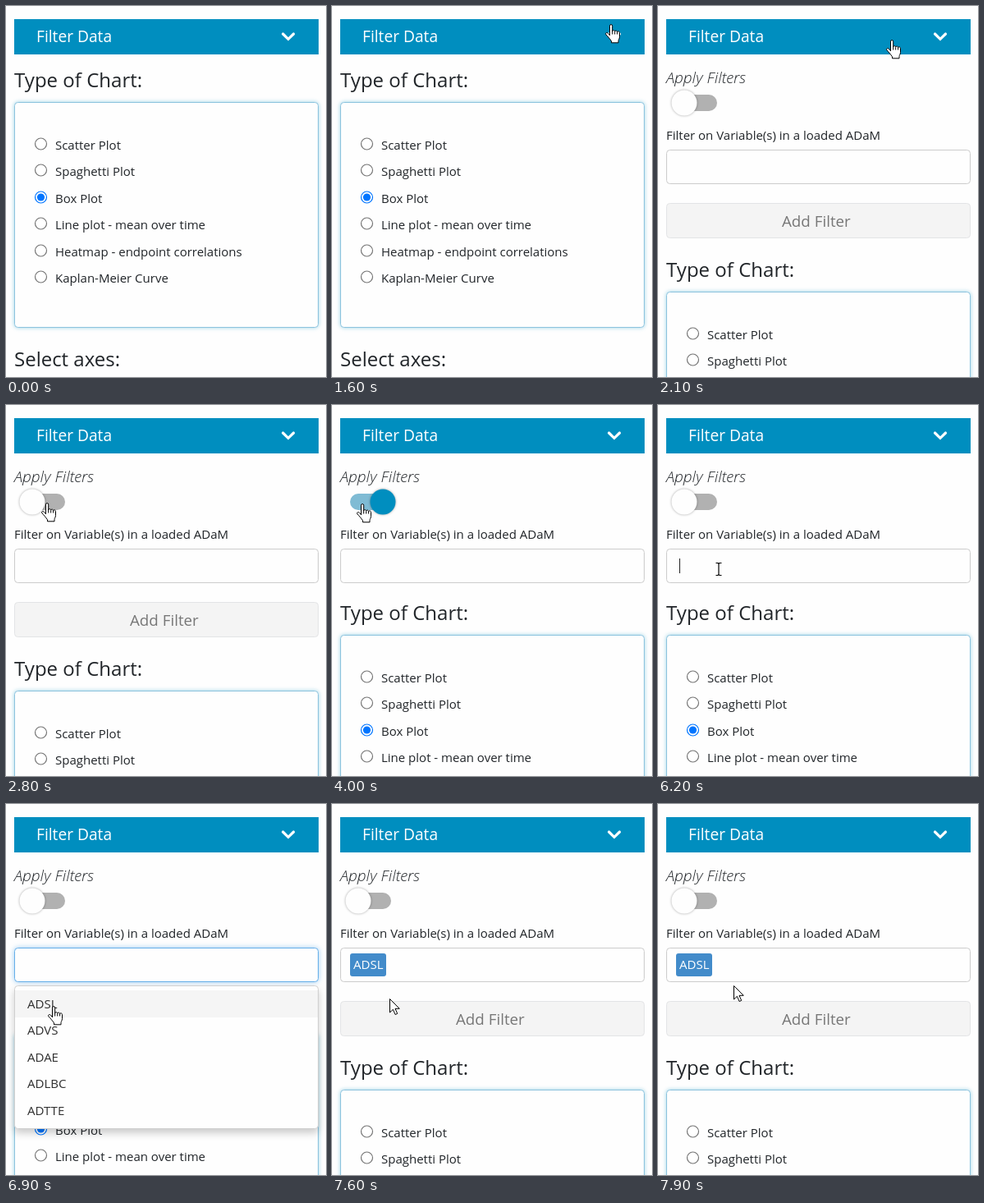
An HTML page for the animation above (8 s loop, 390 px wide and 452 px high).

```html
<!DOCTYPE html>
<html lang="en">
<head>
<meta charset="utf-8">
<title>Filter Data</title>
<style>
html, body { margin: 0; height: 100%; overflow: hidden; background: #fefefe; }
svg { display: block; width: 390px; height: 452px; font: 15px "Open Sans", sans-serif; fill: #212529; }
.big { font-size: 24px; }
.mid { font-size: 19.2px; }
.box { fill: #fefefe; stroke: #8cc3de; filter: drop-shadow(0 0 2.5px rgba(0, 142, 191, .4)); }
.field { fill: #fefefe; stroke: #ccc; }
.field.focus { stroke: #66afe9; filter: drop-shadow(0 0 3px rgba(102, 175, 233, .65)); }
.menu { fill: #fefefe; stroke: #d0d0d0; filter: drop-shadow(0 5px 5px rgba(0, 0, 0, .2)); }
.pointer { fill: #fff; stroke: #000; stroke-linejoin: round; }
</style>
</head>
<body>
<svg viewBox="0 0 390 452">
  <defs><clipPath id="clip"><rect id="window" y="59" width="390" height="0"/></clipPath></defs>

  <g id="charts">
    <text class="big" x="10" y="99">Type of Chart:</text>
    <rect class="box" x="10.5" y="117.5" width="370" height="274" rx="4"/>
    <g id="radios"></g>
    <text class="big" x="10" y="439">Select axes:</text>
    <rect class="box" x="10.5" y="457.5" width="370" height="274" rx="4"/>
  </g>

  <g clip-path="url(#clip)">
    <text class="mid" x="10" y="94" font-style="italic" font-weight="300">Apply Filters</text>
    <rect id="track" x="22" y="108" width="50" height="20" rx="10"/>
    <circle id="knob" cy="118" r="15.5" style="filter:drop-shadow(0 0 1.5px rgba(0,0,0,.35))"/>
    <text x="10" y="163">Filter on Variable(s) in a loaded ADaM</text>
    <rect id="field" class="field" x="10.5" y="175.5" width="370" height="41" rx="4"/>
    <path id="caret" d="M26.5 187v18" stroke="#222"/>
    <g id="tag">
      <rect x="22" y="182" width="44" height="28" rx="3" fill="#428bca"/>
      <text x="26" y="201" fill="#fff">ADSL</text>
    </g>
    <g id="add">
      <rect x="10.5" y="240.5" width="370" height="42" rx="4" fill="#f4f4f4" stroke="#e3e4e6"/>
      <text x="151" y="269" font-size="18.75" fill="#777">Add Filter</text>
    </g>
  </g>

  <g id="menu">
    <rect class="menu" x="10.5" y="221.5" width="370" height="174" rx="4"/>
    <rect x="11" y="227" width="369" height="33" fill="#f5f5f5"/>
  </g>

  <rect x="10" y="16" width="371" height="43" fill="#008ebf"/>
  <text class="mid" x="37" y="44" fill="#fff">Filter Data</text>
  <path d="M337.5 34l6.5 6.3 6.5-6.3" fill="none" stroke="#fff" stroke-width="3.2" stroke-linecap="round"/>

  <g id="cursor">
    <path id="arrow" class="pointer" d="M.5.5V17l3.9-3.7 2.7 6.2 2.6-1.1L7 12.3h5.2z"/>
    <g id="hand" class="pointer" transform="translate(-7)">
      <path d="M5.5 14V2.2a1.6 1.6 0 0 1 3.2 0V9c0-1.9 3-1.9 3 .3 0-1.7 2.9-1.6 2.9.5 0-1.5 2.9-1.2 2.9.8v5c0 2-1.5 3.6-1.5 5v2.2H7.5v-2C6 18.5 3 15 .9 12.8-.3 11 2 9.8 3.4 11.2L5.5 13.6z"/>
      <path d="M8.7 9v3.5M11.7 9.5v3M14.6 10v2.5" fill="none"/>
    </g>
    <path id="beam" d="M-3.5-7.5h2.5l1 1 1-1h2.5M0-6.5v13M-3.5 7.5h2.5l1-1 1 1h2.5" fill="none" stroke="#000" stroke-width="1.2"/>
  </g>
</svg>
<script>
const $ = id => document.getElementById(id);
const set = (id, attrs) => { for (const k in attrs) $(id).setAttribute(k, attrs[k]); };
const show = (id, on) => { $(id).style.display = on ? '' : 'none'; };
const clamp = v => Math.min(1, Math.max(0, v));
const ease = v => { v = clamp(v); return v * v * (3 - 2 * v); };

const charts = ['Scatter Plot', 'Spaghetti Plot', 'Box Plot', 'Line plot - mean over time',
  'Heatmap - endpoint correlations', 'Kaplan-Meier Curve'];
$('radios').innerHTML = charts.map((name, i) => {
  const y = Math.round(167.6 + 32.5 * i), on = i === 2;
  return `<circle cx="42.5" cy="${y}" r="7" fill="#fff" stroke="${on ? '#0075ff' : '#767676'}" stroke-width="1.2"/>` +
    (on ? `<circle cx="42.5" cy="${y}" r="4.6" fill="#0075ff"/>` : '') +
    `<text x="60" y="${y + 7}">${name}</text>`;
}).join('');
$('menu').innerHTML += ['ADSL', 'ADVS', 'ADAE', 'ADLBC', 'ADTTE']
  .map((name, i) => `<text x="26" y="${Math.round(248.6 + 32.5 * i)}" fill="#303030">${name}</text>`).join('');

// Pointer path: time, x, y
const path = [[900, 205, 250], [1600, 340, 22], [1900, 340, 22], [2600, 62, 118], [2800, 50, 119],
  [3100, 37, 120], [5200, 37, 120], [6000, 74, 200], [6200, 74, 200], [6600, 58, 246],
  [7400, 58, 246], [7900, 92, 221]];

function pointerAt(t) {
  const i = path.findIndex(p => p[0] > t);
  if (i < 0) return path[path.length - 1].slice(1);
  const [t0, x0, y0] = path[Math.max(0, i - 1)], [t1, x1, y1] = path[i];
  const k = ease((t - t0) / (t1 - t0 || 1));
  return [x0 + (x1 - x0) * k, y0 + (y1 - y0) * k];
}

function draw(t) {
  const menuOpen = t >= 6300 && t < 7400;
  const addShown = t < 3500 || t >= 7500;
  const shift = Math.round((addShown ? 231 : 163) * ease((t - 1700) / 400));
  set('charts', { transform: `translate(0 ${shift})` });
  set('window', { height: shift });

  const on = ease((t - 3300) / 300) - ease((t - 4800) / 300);
  const mix = (a, b) => `rgb(${a.map((v, i) => v + (b[i] - v) * on)})`;
  set('track', { fill: mix([177, 177, 177], [127, 187, 212]) });
  set('knob', { cx: 32 + 30 * on, fill: mix([254, 254, 254], [0, 142, 191]) });

  $('field').classList.toggle('focus', menuOpen);
  show('caret', t >= 6200 && t < 6700);
  show('tag', t >= 7400);
  show('add', addShown);
  show('menu', menuOpen);

  const [x, y] = pointerAt(t);
  const overToggle = x > 16 && x < 78 && y > 100 && y < 136 && t > 2100;
  const hand = y < 59 || overToggle || menuOpen && y > 222;
  const beam = !hand && shift > 150 && y > 175 && y < 217;
  set('cursor', { transform: `translate(${Math.round(x)} ${Math.round(y)})` });
  show('cursor', t >= 900);
  show('hand', hand);
  show('beam', beam);
  show('arrow', !hand && !beam);
}

function tick() {
  draw(Math.floor(performance.now() % 8000 / 100) * 100);
  requestAnimationFrame(tick);
}
tick();
</script>
</body>
</html>
```
